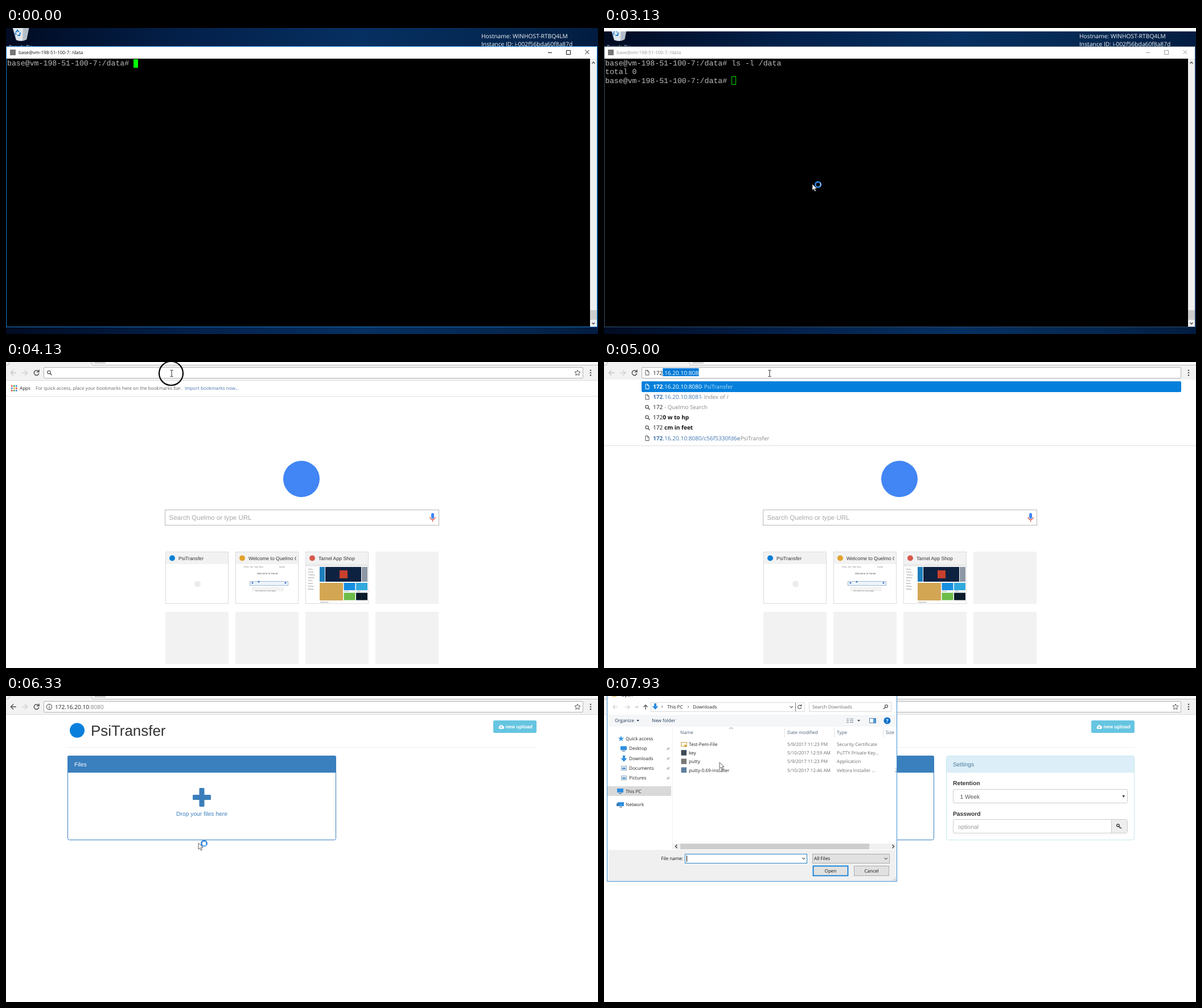
An HTML page that plays this animation: 1040x539 px, repeating every 8000 ms.

```html
<!DOCTYPE html>
<html lang="en">
<head>
<meta charset="utf-8">
<title>File transfer demo</title>
<style>
html, body { margin: 0; width: 100%; height: 100%; overflow: hidden; background: #fff; }
svg { display: block; width: 100vw; height: 100vh; }
text { font-family: "Open Sans", "Noto Sans", sans-serif; white-space: pre; text-rendering: geometricPrecision; }
.arial { font-family: "Liberation Sans", Arial, sans-serif; }
.mono { font-family: "Liberation Mono", "Courier New", monospace; }
</style>
</head>
<body>
<svg id="stage" viewBox="0 0 1040 539" preserveAspectRatio="none"></svg>
<script>
const LOOP = 8000, CHAR = 7.93, DIGIT = 5.75;
const PROMPT = "base@vm-198-51-100-7:/data# ", COMMAND = "ls -l /data";
const ADDRESS = "172.16.20.10:8080";

const rect = (x, y, w, h, fill, more = "") =>
  `<rect x="${x}" y="${y}" width="${w}" height="${h}" fill="${fill}" ${more}/>`;
const box = (x, y, w, h, fill, stroke, more = "") =>
  rect(x + .5, y + .5, w - 1, h - 1, fill, `stroke="${stroke}" ${more}`);
const text = (x, y, s, size, fill, more = "") =>
  `<text x="${x}" y="${y}" font-size="${size}" fill="${fill}" ${more}>${s}</text>`;
const arial = (x, y, s, size, fill, more = "") =>
  text(x, y, s, size, fill, `class="arial" ${more}`);
const ui = (x, y, s, fill = "#222", more = "") => text(x, y, s, 8.15, fill, more);
const path = (d, stroke, w = 1, fill = "none", more = "") =>
  `<path d="${d}" stroke="${stroke}" stroke-width="${w}" fill="${fill}" ${more}/>`;
const dot = (x, y, r, fill, more = "") =>
  `<circle cx="${x}" cy="${y}" r="${r}" fill="${fill}" ${more}/>`;
const group = (id, body, more = "") => `<g id="${id}" ${more}>${body}</g>`;
const bold = 'font-weight="700"';

// Shared icons
const lens = (x, y, c = "#555") =>
  dot(x, y, 2.7, "none", `stroke="${c}" stroke-width="1.3"`) + path(`M${x + 2} ${y + 2}l3 3`, c, 1.5);
const page = (x, y, c = "#555") => path(`M${x} ${y}h3.5l2.5 2.5v6h-6zM${x + 3.5} ${y}v2.5h2.5`, c);
const cloud = (x, y) => path(`M${x + 2} ${y + 8}a2.4 2.4 0 0 1 0 -4.5a3 3 0 0 1 5.6 -1a2.8 2.8 0 0 1 .6 5.5z`, "none", 0, "#fff")
  + path(`M${x + 5} ${y + 7}v-3.5m-1.6 1.6l1.6-1.6l1.6 1.6`, "#5bc0de", 1);
const pin = (x, y) => path(`M${x} ${y}l2.6-2.6m-1.8-1l3 3m-2-2.4l1.8-1.6l1.6 1.6l-1.6 1.8`, "#999", 1);

function desktop() {
  const bin = rect(0, 0, 1040, 539, "url(#sky)")
    + path("M12 0h28l-4 20q-9 5-18 1z", "#b9c3cc", .6, "#dfe5ea")
    + path("M30 0h10l-4 20l-7 2z", "none", 0, "#b4bec8")
    + path("M17 8l3-4l3 3m2 1l-1 5h-4m-2-1l-2-3", "#1d7fd1", 2)
    + ui(5, 35.5, "Recycle Bin", "#fff");
  return bin + text(835, 17.5, "Hostname: WINHOST-RTBQ4LM", 10.25, "#f2f5f8")
    + text(835, 31.5, "Instance ID: i-002f56bda60f8a87d", 10.25, "#f2f5f8");
}

function terminal() {
  const row = (id, y, s) => text(2, y, s, 13.22, "#bbb", `id="${id}" class="mono"`);
  return `<rect id="frame" x=".5" y="32.5" width="1038" height="494" fill="#000"/>`
    + rect(1, 33, 1037, 21, "#fff") + rect(7, 38, 10, 10, "#777")
    + group("caption", ui(22, 46, "base@vm-198-51-100-7: /data", "currentColor")
      + path("M952 43.5h7M984.5 39.5h7v7h-7zM1017.5 39l7 7m0-7l-7 7", "currentColor"))
    + rect(1026, 54, 12, 472, "#f0f0f0") + rect(1026, 497, 12, 17, "#cdcdcd")
    + path("M1029.5 62.5l2.5-2.5l2.5 2.5M1029.5 519l2.5 2.5l2.5-2.5", "#444", 1.3)
    + row("line0", 66, "") + row("line1", 81.3, "total 0") + row("line2", 96.5, PROMPT)
    + `<rect id="block" width="8" height="15"/>`;
}

function browserBar() {
  return rect(0, 0, 1040, 32, "#f2f2f2") + rect(152, 0, 888, 5, "#fafafa")
    + path("M0 5.5h4l3-6M149 -1l3 6.5h888", "#bcbcbc") + rect(155, 0, 20, 3, "#d4d4d4", 'rx="1"')
    + path("M0 32.5h1040", "#ddd")
    + path("M18 19H9m4-4.5L8.5 19l4.5 4.5", "#c8c8c8", 1.5, "none", 'id="back"')
    + path("M28 19h9m-4-4.5l4.5 4.5l-4.5 4.5", "#d0d0d0", 1.5)
    + path("M57 16.5a4.3 4.3 0 1 0 .8 3.5M58 13.5v4h-4", "#555", 1.5)
    + box(66, 9, 948, 20, "#fff", "#b3b3b3", 'rx="1.5"')
    + path("M1004 14l1.5 3.2l3.5.4l-2.6 2.4l.7 3.5l-3.1-1.8l-3.1 1.8l.7-3.5l-2.6-2.4l3.5-.4z", "#555", 1, "none", 'id="star"')
    + [14.7, 19, 23.3].map(y => dot(1027, y, 1.3, "#555")).join("");
}

function newTab() {
  const tile = (x, y) => rect(x, y, 111, 92, "#f2f2f2");
  const site = (x, name, colour) => box(x, 334, 111, 92, "#fff", "#dcdcdc") + rect(x + 1, 335, 109, 21, "#f2f2f2")
    + dot(x + 12, 345.5, 5, colour) + arial(x + 23, 348.5, name, 8.7, "#333", `clip-path="url(#tileText)"`);
  const tiny = (x, y, s) => arial(x, y, s, 3.2, "#666");
  const apps = [0, 4, 8].map((dx, i) => [0, 4, 8].map((dy, j) =>
    rect(9 + dx, 41 + dy, 2.6, 2.6, ["#d9483b", "#3a9b56", "#4a7fd6", "#e0a92c"][(i + 2 * j) % 4])).join("")).join("");
  const art = [[551, 361, 9, 26, "#1d7fbd"], [561, 361, 63, 26, "#0d2140"], [625, 361, 10, 26, "#8d97a5"],
    [586, 367, 14, 14, "#c8402c"], [551, 389, 41, 31, "#d3a654"], [593.5, 389, 20, 13, "#168ee0"],
    [615, 389, 20, 13, "#31a9dc"], [593.5, 406.5, 20, 13, "#6cbc48"], [615, 406.5, 20, 13, "#0a1b2c"]];
  let s = rect(0, 33, 1040, 506, "#fff") + apps + ui(24, 49, "Apps", "#222")
    + ui(52, 49, "For quick access, place your bookmarks here on the bookmarks bar.", "#666")
    + ui(314, 49, "Import bookmarks now...", "#4a72b0") + path("M0 60.5h1040", "#e2e2e2")
    + dot(519, 206, 32, "#4285f4")
    + box(279, 260, 482, 28, "#fff", "#b8b8b8")
    + arial(286.5, 278, "Search Quelmo or type URL", 11.56, "#a9a9a9")
    + rect(747, 266, 5, 10, "#4285f4", 'rx="2.5"') + path("M745 273a4.5 4.5 0 0 0 9 0M749.5 278v3.5", "#d9594c", 1.4);
  s += site(280, "PsiTransfer", "#0b7fd6") + dot(336.5, 391, 5.5, "#ececec")
    + site(403, "Welcome to Quelmo C", "#e0a32e")
    + tiny(418, 362, "Home  Tour  Help  More") + tiny(480, 362, "Search") + arial(441, 374, "Welcome to Tarnel", 4.4, "#555")
    + box(428, 386, 68, 8, "#eef4fb", "#9fb8d8") + dot(433, 389, 1.6, "#3b78c4") + dot(444, 387, 1.6, "#3b78c4") + dot(491, 389, 1.6, "#3b78c4")
    + rect(432, 396, 56, 8, "#f3f3f3") + tiny(438, 404, "One place for every page")
    + site(526, "Tarnel App Shop", "#d9594c") + rect(527, 356, 109, 4, "#e9e9e9");
  ["Shop", "Extras", "Themes", "Games", "Tools", "News", "Photos", "Rating"].forEach((w, i) => s += tiny(531, 366 + i * 5, w));
  s += art.map(a => rect(...a)).join("") + tiny(552, 424, "Adventure") + tiny(594, 405, "Photo") + tiny(616, 405, "Paint");
  return s + tile(649, 334) + [280, 403, 526, 649].map(x => tile(x, 440)).join("");
}

function suggestions() {
  const blue = "#4477b0", grey = "#888";
  const line = (i, s, fill) => text(86, 47 + i * 18.1, s, 10.1, fill);
  const note = (x, i, s, fill = grey) => text(x, 47 + i * 18.1, "- " + s, 9.8, fill);
  const hit = s => `<tspan ${bold}>172</tspan>${s}`;
  return rect(0, 31, 1040, 116, "#fff") + path("M0 147.5h1040", "#ddd")
    + rect(66, 34, 948, 19, "#0480dc", 'rx="2"')
    + page(73, 39, "#fff") + page(73, 57.5) + page(73, 130)
    + [79, 97, 115].map(y => lens(75.5, y)).join("")
    + line(0, hit(".16.20.10:8080"), "#fff") + note(170, 0, "PsiTransfer", "#b5dbf6")
    + line(1, hit(".16.20.10:8081"), blue) + note(170, 1, "Index of /")
    + line(2, "172", "#222") + note(106, 2, "Quelmo Search")
    + line(3, `172<tspan ${bold}>0 w to hp</tspan>`, "#111")
    + line(4, `172<tspan ${bold}> cm in feet</tspan>`, "#111")
    + line(5, hit(".16.20.10:8080/c56f5330fd6e"), blue) + note(234, 5, "PsiTransfer");
}

function transfer() {
  return rect(0, 33, 1040, 506, "#fff") + dot(125, 60.5, 13, "#0a80dc")
    + arial(149, 70, "PsiTransfer", 25.9, "#333")
    + rect(856, 43, 76, 22, "#66c5e1", 'rx="2.5"') + cloud(865, 50)
    + arial(877.5, 57, "new upload", 8.6, "#fff", bold) + path("M108 90.5h824", "#eee")
    + box(108, 105, 472, 149, "#fff", "#3a7fbb", 'rx="3"')
    + path("M108 135v-27q0-3 3-3h466q3 0 3 3v27z", "none", 0, "#3a7fbe")
    + arial(120, 123.5, "Files", 10.3, "#fff")
    + rect(339.5, 162, 9, 33, "#3a7fbb", 'rx="1.5"') + rect(328, 174, 32, 9, "#3a7fbb", 'rx="1.5"')
    + arial(344, 211, "Drop your files here", 10.3, "#3a7fbb", 'text-anchor="middle"');
}

function settings() {
  return box(601, 105, 331, 149, "#fff", "#c5e9f1", 'rx="3"') + rect(602, 106, 329, 29, "#dceef7")
    + arial(613, 123.5, "Settings", 10.3, "#4a7d9b")
    + arial(613, 157, "Retention", 10.3, "#333", bold) + arial(613, 210.5, "Password", 10.3, "#333", bold)
    + box(613, 164, 307, 25, "#fff", "#ccc", 'rx="2.5"') + arial(625.5, 180.5, "1 Week", 10.3, "#555")
    + path("M910.5 175h4.5l-2.2 4z", "none", 0, "#333")
    + box(613, 217, 307, 25, "#fff", "#ccc", 'rx="2.5"') + rect(892, 218, 27, 23, "#eee") + path("M891.5 218v23", "#ccc")
    + arial(622, 233.5, "optional", 10.3, "#999")
    + dot(903, 228, 2.2, "none", 'stroke="#444" stroke-width="1.5"') + path("M904.5 229.5l4.5 4m-2.5-2l-1 1.2", "#444", 1.4);
}

function dialog() {
  const grey = "#6d6d6d", blue = "#2f8fe0";
  const down = (x, y) => path(`M${x} ${y}h4v5h3.5l-5.5 6l-5.5-6h3.5z`, "none", 0, blue);
  const chevron = (x, y, c = "#666") => path(`M${x} ${y}l2.7 2.7l2.7-2.7`, c, 1.1);
  const caret = (x, y) => path(`M${x} ${y}h5l-2.5 3z`, "none", 0, "#345");
  const screen = (x, y) => rect(x, y, 11, 7, blue) + rect(x + 3, y + 8, 5, 1.2, "#4b6a86");
  const button = (x, w, s, edge, sw) => box(x, 299, w, 18, "#e1e1e1", edge, `stroke-width="${sw}"`)
    + ui(x + w / 2, 311, s, "#111", 'text-anchor="middle"');
  let s = box(5, -4, 510, 331, "#fff", "#3f8fd0") + rect(14, -3, 8, 4, "#e8b93a") + ui(30, 1, "Open")
    + path("M24 19.5h-8m3.5-3.5l-3.5 3.5l3.5 3.5M37 19.5h8m-3.5-3.5l3.5 3.5l-3.5 3.5", "#d0d0d0", 1.2)
    + chevron(55, 18, "#bbb") + path("M73 24v-8m-3.5 3.5l3.5-3.5l3.5 3.5", "#555", 1.3)
    + box(82, 11, 271, 17, "#fff", "#d9d9d9") + down(88, 13) + path("M101 17l2 2l-2 2M147 17l2 2l-2 2M336.5 12v15", "#777")
    + ui(111, 22, "This PC") + ui(156, 22, "Downloads") + chevron(326.5, 18)
    + path("M346 17a3.2 3.2 0 1 0 .8 3M347 14.5v3h-3", "#555", 1.1)
    + box(360, 11, 145, 17, "#fff", "#d9d9d9") + ui(366, 22, "Search Downloads", grey)
    + dot(496, 18, 2.4, "none", 'stroke="#555" stroke-width="1.2"') + path("M494 20l-3 3", "#555", 1.4)
    + rect(6, 33, 508, 21, "#f5f6f7") + ui(19, 46, "Organize", "#1e395b") + caret(57, 42) + ui(84, 46, "New folder", "#1e395b")
    + path("M426 40.5h4m2 0h6M426 43.5h4m2 0h6M426 46.5h4m2 0h6", "#789") + caret(445, 42)
    + box(466, 39, 12, 9, "#fff", "#4b7fb0") + rect(473, 40, 4, 7, "#4b9be0")
    + dot(497.5, 43.5, 6, "#0a6fc8") + text(497.5, 47, "?", 9, "#fff", `${bold} text-anchor="middle"`);
  // Side list
  s += path("M120.5 55v215", "#f0f0f0") + rect(6, 159, 112, 17, "#d9d9d9")
    + path("M30 70l1.4 3.4l3.6.2l-2.8 2.4l1 3.6l-3.2-2l-3.2 2l1-3.6l-2.8-2.4l3.6-.2z", "none", 0, "#3d98dd") + ui(38, 78, "Quick access");
  ["Desktop", "Downloads", "Documents", "Pictures"].forEach((name, i) => {
    const y = 92.4 + i * 17.3;
    s += ui(44, y + 3, name) + pin(110, y + 3);
    s += i == 1 ? down(33, y - 5) : i ? box(30, y - 4, 10, 8, "#eef4fa", "#8aa4bd") + rect(32, y - 1, 6, 3, "#5b9bd0") : screen(29, y - 4);
  });
  s += screen(23, 163) + ui(38, 171, "This PC") + screen(24, 187) + rect(22, 189, 5, 5, "#3b7bb4") + ui(38, 194, "Network");
  // File list
  s += path("M220.5 58l3-2.5l3 2.5", "#888") + path("M317.5 55v18M404.5 55v18M490.5 55v18", "#e2e2e2");
  [[134, "Name"], [322, "Date modified"], [409, "Type"], [495, "Size"]].forEach(([x, w]) => s += ui(x, 67, w, "#4c607a"));
  [["Test-Pem-File", "5/9/2017 11:23 PM", "Security Certificate", "#e5c97a"],
   ["key", "5/10/2017 12:59 AM", "PuTTY Private Key...", "#3d4a58"],
   ["putty", "5/9/2017 11:23 PM", "Application", "#777"],
   ["putty-0.69-installer", "5/10/2017 12:46 AM", "Veltora Installer ...", "#5d7fa0"]].forEach(([name, date, type, c], i) => {
    const y = 88 + i * 15.2;
    s += (i ? rect(135.5, y - 8, 9.5, 9.5, c) : box(135, y - 7, 11, 8, "#fbf4df", "#c9ab5c") + dot(143, y, 2, "#d49a2a"))
      + ui(149, y, name) + ui(322, y, date, grey) + ui(409, y, type, grey);
  });
  s += ui(511, 133.5, "2", grey, 'clip-path="url(#edge)"');
  return s + rect(121, 260, 393, 10, "#f0f0f0") + rect(134, 260, 332, 10, "#cdcdcd")
    + path("M128.5 262l-3 3l3 3M506.5 262l3 3l-3 3", "#333", 1.3)
    + rect(6, 271, 508, 55, "#f0f0f0") + ui(139, 289, "File name:", "#111", 'text-anchor="end"')
    + box(142, 278, 215, 17, "#fff", "#2f86c8") + chevron(348, 285) + path("M145.5 281v11", "#000", 1, "none", 'id="caret"')
    + box(366, 278, 136, 17, "#e1e1e1", "#adadad") + ui(369, 289, "All Files", "#111") + chevron(492.5, 285)
    + button(367, 62, "Open", "#0078d7", 1.7) + button(439, 62, "Cancel", "#adadad", 1)
    + [[511, 323], [508, 323], [511, 320]].map(([x, y]) => rect(x, y, 1.5, 1.5, "#aaa")).join("");
}

const stage = document.getElementById("stage");
stage.innerHTML = `<defs>
  <linearGradient id="sky"><stop offset="0" stop-color="#010b22"/><stop offset=".3" stop-color="#03204a"/>
  <stop offset=".6" stop-color="#063061"/><stop offset=".85" stop-color="#042750"/><stop offset="1" stop-color="#021c40"/></linearGradient>
  <clipPath id="tileText"><path d="M280 334h109v22h-109zM403 334h107v22h-107zM526 334h109v22h-109z"/></clipPath>
  <clipPath id="edge"><path d="M500 120h14v20h-14z"/></clipPath></defs>`
  + group("desk", desktop() + terminal()) + rect(0, 0, 1040, 6, "#fff", 'id="strip"')
  + group("browser", rect(0, 0, 1040, 539, "#fff") + group("newTab", newTab()) + group("site", transfer() + group("settings", settings()))
    + browserBar() + group("iconLens", lens(75.5, 18)) + group("iconPage", page(73, 14.5))
    + group("iconInfo", dot(76, 19, 4.6, "none", 'stroke="#555" stroke-width="1.1"') + path("M76 18v3.5M76 16v1", "#555", 1.2))
    + `<rect id="marked" y="11" height="14" fill="#0078d7"/>` + text(86, 22.5, "", 10.1, "#222", 'id="address"')
    + group("list", suggestions()))
  + group("dialog", dialog())
  + `<circle id="click" r="21" fill="none" stroke="#000" stroke-width="2.2"/>`
  + group("beam", path("M-2.5-5.5h2l.5.5l.5-.5h2M0-5v10M-2.5 5.5h2l.5-.5l.5.5h2", "#222"))
  + group("arrow", path("M0 0v11l2.6-2.4l1.9 4.2l1.9-.8l-1.9-4.1h3.6z", "#333", .8, "#fff")
    + group("busy", dot(10, .7, 4.7, "none", 'stroke="#2f86dd" stroke-width="2.6"')
      + path("M10-4a4.7 4.7 0 0 1 4.7 4.7", "#8cc4f7", 1.8, "none", 'id="spin"')));

const $ = id => document.getElementById(id);
const set = (id, props) => { for (const k in props) $(id).setAttribute(k, props[k]); };
const show = (id, on) => { $(id).style.display = on ? "" : "none"; };
const within = (t, a, b) => t >= a && t < b;
const ramp = (t, a, b) => Math.min(1, Math.max(0, (t - a) / (b - a)));
const ease = p => p * p * (3 - 2 * p);

const ROUTE = [[2650, 400, 560], [3070, 366, 275], [3500, 366, 275], [3870, 291, 20], [5800, 291, 20],
  [6250, 338, 259], [6500, 338, 259], [6850, 344, 185], [7470, 344, 185], [7930, 203, 117]];

function pointerAt(t) {
  let [, x, y] = ROUTE[0];
  ROUTE.slice(1).forEach(([end, nx, ny], i) => {
    const p = ease(ramp(t, ROUTE[i][0], end));
    x += (nx - x) * p;
    y += (ny - y) * p;
  });
  return [x, y];
}

function draw(t) {
  // Terminal
  const typed = Math.floor(ramp(t, 70, 870) * COMMAND.length), ran = t >= 1000, active = t < 2800;
  $("line0").textContent = PROMPT + COMMAND.slice(0, typed);
  show("line1", ran);
  show("line2", ran);
  set("block", { x: (ran ? 224 : 224 + typed * CHAR) + (active ? 0 : .5), y: (ran ? 85 : 55) + (active ? 0 : .5),
    width: active ? 8 : 7, height: active ? 15 : 14, fill: active ? "#0f0" : "none", stroke: active ? "none" : "#0d0" });
  set("caption", { color: active ? "#111" : "#999" });
  set("frame", { stroke: active ? "#1c7fd0" : "#33516e" });
  show("strip", t >= 3130);

  // Browser
  const open = t >= 3200, loaded = t >= 6070;
  show("browser", open);
  show("desk", !open);
  show("newTab", t >= 3330 && !loaded);
  show("site", loaded);
  set("settings", { opacity: ramp(t, 6380, 6580) });
  const keys = t < 4470 ? 0 : Math.min(3, 1 + Math.floor((t - 4470) / 130));
  const entered = t >= 5530, picking = keys > 0 && !entered;
  show("list", picking);
  show("star", !picking);
  show("marked", picking);
  set("marked", { x: 86 + keys * DIGIT, width: 80.5 - keys * DIGIT });
  const [head, tail] = entered ? [12, "#888"] : [keys, "#fff"];
  $("address").innerHTML = keys ? `${ADDRESS.slice(0, head)}<tspan fill="${tail}">${ADDRESS.slice(head)}</tspan>` : "";
  show("iconLens", !keys);
  show("iconPage", keys && !loaded);
  show("iconInfo", loaded);
  set("back", { stroke: loaded ? "#555" : "#c8c8c8" });

  // File chooser
  show("dialog", t >= 7130);
  set("dialog", { opacity: ramp(t, 7100, 7270) });
  show("caret", t % 1060 >= 430);

  // Pointer
  const [x, y] = pointerAt(t), beam = open && y < 32, place = { transform: `translate(${x} ${y})` };
  set("beam", place);
  set("arrow", place);
  show("beam", beam);
  show("arrow", t >= 2650 && !beam);
  show("busy", within(t, 2850, 3600) || within(t, 5530, 6500));
  set("spin", { transform: `rotate(${t * .36} 10 .7)` });
  show("click", within(t, 4070, 4270) || within(t, 6900, 7100));
  set("click", { cx: x - 1, cy: y });
}

function tick() {
  draw(performance.now() % LOOP);
  requestAnimationFrame(tick);
}
tick();
</script>
</body>
</html>
```
